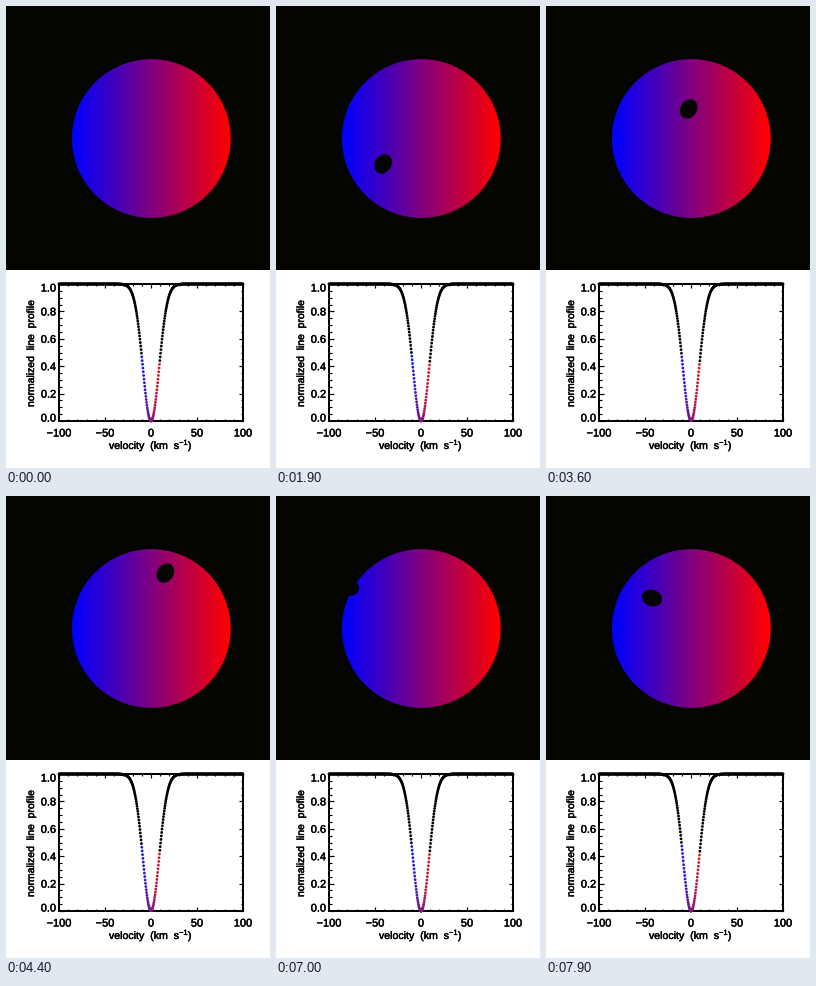
These frames come from a looping animation (264x462 px, 8000 ms). A matplotlib script:

```python
import numpy as np
import matplotlib.pyplot as plt
from matplotlib.animation import FuncAnimation
from matplotlib.patches import Circle, Ellipse, Rectangle
from matplotlib.patheffects import withStroke

W, H, DPI = 264, 462, 66
PT = 72 / DPI  # points per pixel
FRAMES, INTERVAL = 80, 100

SKY = "#040500"
STAR_X, STAR_Y, STAR_R = 145.3, 132.5, 79.4
SPOT_LONG, SPOT_SHORT = 10.2, 8.2

LEFT, RIGHT, TOP, BOTTOM = 53, 237, 278, 415
LINE = 2 * PT
V_ROT, V_STEP = 10, 0.4
WIDTH = 8.9                                 # of the whole line
LOCAL_WIDTH = np.sqrt(WIDTH**2 - V_ROT**2 / 4)
BLOCKED = SPOT_LONG * SPOT_SHORT / STAR_R**2

# first frame, last frame, start position, step per frame
TRANSITS = [
    (9, 52, np.array([86.2, 190.3]), np.array([2.09, -3.235])),
    (70, 79, np.array([73.0, 91.3]), np.array([3.67, 1.19])),
]

plt.rcParams.update({
    "font.family": "Liberation Sans",
    "mathtext.fontset": "custom",
    "mathtext.rm": "Liberation Sans",
})

fig = plt.figure(figsize=(W / DPI, H / DPI), dpi=DPI, facecolor="white")
ax = fig.add_axes([0, 0, 1, 1])
ax.axis("off")


def x_of(v):
    return LEFT + (v + 100) / 200 * (RIGHT - LEFT)


def y_of(f):
    return BOTTOM - f * (BOTTOM - TOP)


def doppler(v):
    t = np.clip((np.asarray(v) + V_ROT) / (2 * V_ROT), 0, 1)
    return np.stack([t, 0 * t, 1 - t], axis=-1)


def line(x0, y0, x1, y1, width=1.2 * PT):
    ax.plot([x0, x1], [y0, y1], color="black", lw=width, solid_capstyle="butt")


def label(x, y, text, ha="center", va="center", size=11, **kw):
    ax.text(x, y, text, fontsize=size * PT, ha=ha, va=va, color="black",
            path_effects=[withStroke(linewidth=0.5, foreground="black")], **kw)


def draw_star():
    ax.add_patch(Rectangle((0, 0), W, 264, fc=SKY, lw=0))
    bands = doppler(np.linspace(-V_ROT, V_ROT, int(2 * V_ROT / V_STEP)))
    image = ax.imshow(
        bands[None], aspect="auto", interpolation="nearest", zorder=1.5,
        extent=(STAR_X - STAR_R, STAR_X + STAR_R, STAR_Y + STAR_R, STAR_Y - STAR_R))
    image.set_clip_path(Circle((STAR_X, STAR_Y), STAR_R, transform=ax.transData))


def draw_plot_frame():
    ax.add_patch(Rectangle((LEFT, TOP), RIGHT - LEFT, BOTTOM - TOP,
                           fill=False, ec="black", lw=LINE))
    for v in range(-100, 101, 10):
        size = 4 if v % 50 == 0 else 2.3
        line(x_of(v), BOTTOM, x_of(v), BOTTOM - size)
        line(x_of(v), TOP, x_of(v), TOP + size)
    for i in range(21):
        size = 4.5 if i % 4 == 0 else 2.5
        y = y_of(i / 20)
        line(LEFT, y, LEFT + size, y)
        line(RIGHT, y, RIGHT - size, y)

    for v in range(-100, 101, 50):
        label(x_of(v), 430.5, str(v).replace("-", "\u2212"), va="baseline")
    for i in range(6):
        nudge = {0: -3.5, 5: 3.5}.get(i, 0)
        label(50, y_of(i / 5) + nudge, f"{i / 5:.1f}", ha="right",
              va="center_baseline")
    label(145, 443, r"velocity  (km  s$^{\mathrm{-1}}$)", va="baseline", size=10.6)
    label(25, 347.5, "normalized  line  profile", rotation=90, size=10.4)


def spot_at(frame):
    for first, last, start, step in TRANSITS:
        if first <= frame <= last:
            return start + (frame - first) * step, step
    return None, None


def profile(spot):
    depth = np.exp(-velocity**2 / (2 * WIDTH**2))
    if spot is None:
        return 1 - depth
    gap = np.hypot(spot[0] - STAR_X, spot[1] - STAR_Y)
    cover = np.clip((STAR_R + 9 - gap) / 18, 0, 1) * BLOCKED
    center = V_ROT * (spot[0] - STAR_X) / STAR_R
    local = WIDTH / LOCAL_WIDTH * np.exp(
        -(velocity - center)**2 / (2 * LOCAL_WIDTH**2))
    return 1 - (depth - cover * local) / (1 - cover)


draw_star()
draw_plot_frame()

spot_patch = Ellipse((0, 0), 2 * SPOT_LONG, 2 * SPOT_SHORT, fc=SKY, lw=0, zorder=2)
ax.add_patch(spot_patch)

velocity = np.linspace(-100, 100, int(200 / V_STEP) + 1)
on_star = (velocity > -V_ROT - 0.1) & (velocity < V_ROT - 0.7)
colors = np.where(on_star[:, None], 0.1 + 0.8 * doppler(velocity), 0)
dots = ax.scatter(x_of(velocity), y_of(profile(None)), c=colors,
                  s=(2.8 * PT)**2, lw=0, zorder=4)

ax.set_xlim(0, W)
ax.set_ylim(H, 0)


def update(frame):
    spot, step = spot_at(frame)
    spot_patch.set_visible(spot is not None)
    if spot is not None:
        spot_patch.set_center(spot)
        spot_patch.set_angle(np.degrees(np.arctan2(step[1], step[0])))
    dots.set_offsets(np.column_stack([x_of(velocity), y_of(profile(spot))]))
    return spot_patch, dots


animation = FuncAnimation(fig, update, frames=FRAMES, interval=INTERVAL,
                          repeat=True, repeat_delay=0)
plt.show()
```
